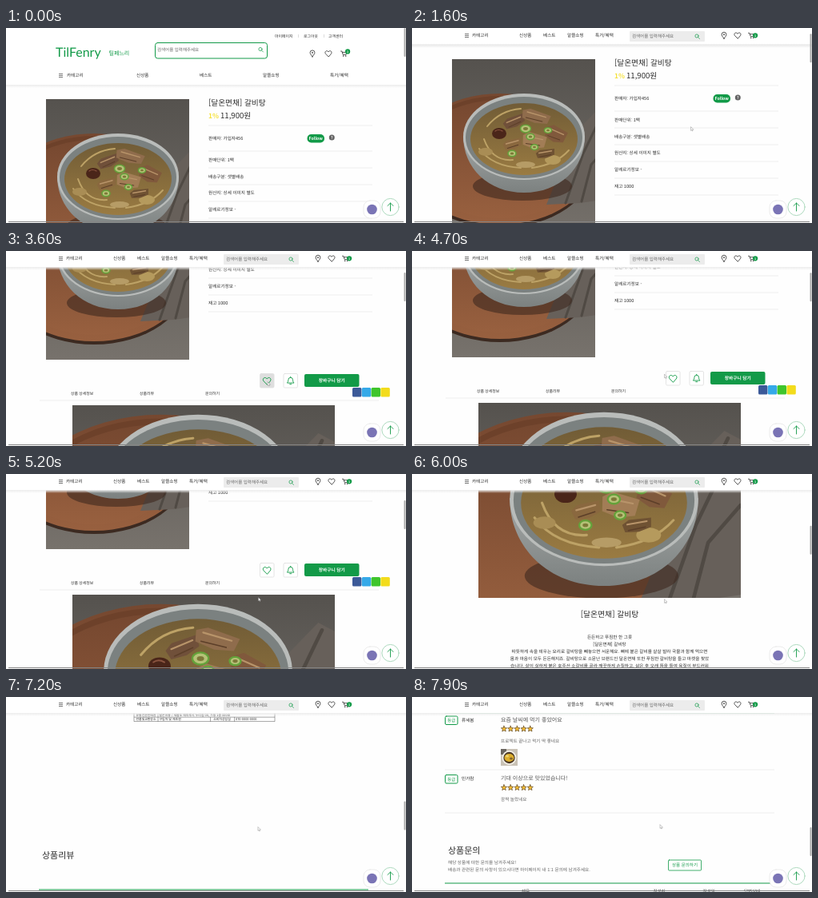
Write an HTML page that moves like this. It is 500 px wide and 244 px high and loops after 8000 ms.

```html
<!DOCTYPE html>
<html lang="ko">
<head>
<meta charset="utf-8">
<style>
html, body { margin: 0; width: 500px; height: 244px; overflow: hidden; background: #fefefe; }
svg { display: block; }
text { font-family: "Noto Sans CJK KR", "Noto Sans CJK", "Noto Sans KR", sans-serif; white-space: pre; text-rendering: geometricPrecision; }
</style>
</head>
<body>
<svg id="stage" width="500" height="244" viewBox="0 0 500 244"></svg>
<script>
const GREEN = '#129a48', INK = '#2b2b2b', PALE = '#e4e4e4';

// Basic shapes; text is placed by its vertical middle.
const text = (x, y, s, size = 5.6, attrs = '', fill = INK) =>
  `<text x="${x}" y="${y + size * .36}" font-size="${size}" fill="${fill}" ${attrs}>${s}</text>`;
const mid = (x, y, s, size, attrs = '', fill) => text(x, y, s, size, 'text-anchor="middle" ' + attrs, fill);
const rect = (x, y, w, h, fill, attrs = '') =>
  `<rect x="${x}" y="${y}" width="${w}" height="${h}" fill="${fill}" ${attrs}/>`;
const circle = (x, y, r, fill, attrs = '') => `<circle cx="${x}" cy="${y}" r="${r}" fill="${fill}" ${attrs}/>`;
const oval = (x, y, rx, ry, fill, attrs = '') =>
  `<ellipse cx="${x}" cy="${y}" rx="${rx}" ry="${ry}" fill="${fill}" ${attrs}/>`;
const path = (d, fill = 'none', attrs = '') => `<path d="${d}" fill="${fill}" ${attrs}/>`;
const rule = (x1, x2, y, color = PALE, w = .7) => rect(x1, y - w / 2, x2 - x1, w, color);
const at = (x, y, s, more = '') => `<g transform="translate(${x} ${y}) ${more}">${s}</g>`;
const frame = (x, y, w, h, s) => `<svg x="${x}" y="${y}" width="${w}" height="${h}">${s}</svg>`;
const outline = (color, w = 1) => `stroke="${color}" stroke-width="${w}" stroke-linejoin="round" stroke-linecap="round"`;

// Icons
const HEART = 'M0 3.8L-3.5.2C-5-1.6-3.2-4-1.3-3.2Q-.4-2.8 0-2Q.4-2.8 1.3-3.2C3.2-4 5-1.6 3.5.2Z';
const heart = (x, y, color) => at(x, y, path(HEART, 'none', outline(color, .8)));
const lens = (x, y) => at(x, y, circle(-.5, -.5, 2.1, 'none', outline(GREEN, .7)) + path('M1 1L3 3', 'none', outline(GREEN, .7)));
const pin = (x, y) => at(x, y, path('M0 4C-2 1-2.9.2-2.9-1.2A2.9 2.9 0 0 1 2.9-1.2C2.9.2 2 1 0 4Z', 'none', outline(INK, .8)) + circle(0, -1.2, .9, INK));
const cart = (x, y, badgeY) => at(x, y,
  path('M-4-3H-2.6L-1.3 1.3H2.6L3.6-1.6H-2', 'none', outline(INK, .8)) +
  circle(-.8, 3, .8, INK) + circle(2.2, 3, .8, INK) +
  circle(4.6, badgeY, 3.1, GREEN) + mid(4.6, badgeY, '1', 3.6, 'font-weight="700"', '#fff'));
const menu = (x, y) => [-2, 0, 2].map(d => rule(x, x + 5, y + d, '#555', .8)).join('');
const icons = (xs, y, badgeY) => pin(xs[0], y) + heart(xs[1], y, INK) + cart(xs[2], y, badgeY);
const star = (x, y) => {
  const p = [...Array(10).keys()].map(i => {
    const r = i % 2 ? 1.7 : 3.8, a = i * Math.PI / 5;
    return (x + r * Math.sin(a)).toFixed(2) + ' ' + (y - r * Math.cos(a)).toFixed(2);
  });
  return path('M' + p.join('L') + 'Z', '#f9bf35', outline('#5c4522', .7));
};

// A soup bowl on a wooden tray beside a cloth, centred on the bowl
const chunk = ([x, y, w, h, turn, color]) => at(x, y,
  path(`M${-w / 2} ${-h / 4}L${-w / 4} ${-h / 2}L${w / 2} ${-h / 3}L${w / 2.3} ${h / 3}L0 ${h / 2}L${-w / 2.2} ${h / 3}Z`, color) +
  path(`M${-w / 3} ${-h / 5}L${w / 3} ${-h / 7}`, 'none', outline('#b8946a', 1.4)) +
  path(`M${-w / 3} ${h / 4}L${w / 4} ${h / 4}`, 'none', outline('#5c3f29', 1)), `rotate(${turn})`);
const meat = [[-12, -20, 28, 14, -25, '#70503a'], [15, -26, 36, 16, 14, '#8f6c4c'], [40, -4, 27, 20, 20, '#80593c'],
  [13, 4, 30, 20, 8, '#a27d56'], [-14, 8, 24, 13, -18, '#8a683f'], [27, 20, 24, 11, -12, '#6f5233']];
const onions = [[2, -11, 6.5], [8, -1, 5], [-15, 20, 5], [13, 12, 4.5], [30, -9, 4.5]];

const meal =
  oval(-30, 31, 118, 82, '#3c2a21') + oval(-30, 27, 118, 82, 'url(#wood)') +
  oval(-30, 24, 112, 76, '#6d412a') + oval(-30, 27, 110, 74, 'url(#wood)') +
  path('M66-8L97-40L112-32V76L70 82L28 84Z', '#67605a') +
  path('M100-34L74 20L52 82M110 4L84 34L72 80', 'none', outline('#504a44', 3)) +
  oval(-2, 61, 62, 18, '#3e291e', 'opacity=".6"') +
  path('M-76-2C-76 38-45 69 0 69S76 38 76-2Z', 'url(#clay)') +
  oval(0, -1, 76, 54, '#b9bcba') + oval(0, 0, 73, 51, '#7b8180') + oval(0, 2, 67, 45, 'url(#broth)') +
  path('M-56 14Q-40 36-4 38M-50 2Q-40 30-14 28M-46-14Q-30-34-4-36M10 38Q40 34 56 16', 'none', outline('#bda266', 2)) +
  oval(-48, 18, 9, 5, '#a98d55') + oval(36, 28, 10, 6, '#b59a5d') + oval(2, 34, 12, 4, '#b69c66') +
  meat.map(chunk).join('') + oval(-31, -5, 9, 7, '#4a2519') + path('M-36-8Q-32-11-27-8', 'none', outline('#8a5440', 1.2)) +
  onions.map(([x, y, r]) => oval(x, y, r, r * .75, '#b5c277', outline('#64a23a', 1.5)) + oval(x, y, r * .45, r * .3, '#7d7838')).join('');

const productPhoto = frame(50, 89, 179, 230, rect(0, 0, 179, 230, 'url(#slate)') + at(90, 98, meal));
const detailPhoto = frame(83, 376, 328, 219, rect(0, 0, 328, 219, 'url(#slate)') + at(157, 97, meal, 'scale(1.55)'));

// Page sections
const fullHeader = () => rect(0, 0, 500, 71, '#fff') + rect(0, 71, 500, 4, 'url(#shade)') +
  text(336, 10, '마이페이지', 4.9) + text(372, 10, '로그아웃', 4.9) + text(403, 10, '고객센터', 4.9) +
  rect(365, 8, .5, 4, '#bbb') + rect(397, 8, .5, 4, '#bbb') +
  `<text x="62" y="36" font-size="16" fill="${GREEN}" style="font-family:Lato,sans-serif">TilFenry</text>` +
  text(128.5, 31, '틸페느리', 7, 'font-weight="500"', GREEN) +
  rect(186.5, 18.5, 140, 19.5, '#fff', 'rx="3" ' + outline(GREEN)) +
  text(189, 27, '검색어를 입력해주세요', 5.5, '', '#666') + lens(318.5, 27) +
  icons([383, 403, 422.5], 32, -2.6) + menu(66, 59.5) +
  [[76, '카테고리'], [163, '신상품'], [242, '베스트'], [321, '알뜰쇼핑'], [405, '특가/혜택']]
    .map(([x, s]) => text(x, 59, s, 5.6, 'font-weight="500"')).join('');

const slimHeader = () => rect(0, 0, 500, 20, '#fff') + rect(0, 20, 500, 4, 'url(#shade)') + menu(66, 9.5) +
  [[75, '카테고리'], [134, '신상품'], [164, '베스트'], [194, '알뜰쇼핑'], [229, '특가/혜택']]
    .map(([x, s]) => text(x, 8.5, s, 5.6, 'font-weight="500"')).join('') +
  rect(272, 4, 94, 13, '#ececec', 'rx="1"') + text(275, 10, '검색어를 입력해주세요', 5.5, '', '#666') +
  lens(356.5, 10.5) + icons([390, 407, 424.5], 9.3, 0);

const summary = () => productPhoto + text(253, 94, '[달온면채] 갈비탕', 9.7) +
  text(253, 109.5, '1%', 8.4, 'font-weight="700"', '#f5e23c') + text(268, 109.5, '11,900원', 9.6) +
  [122, 154, 175, 196, 217, 238, 259].map(y => rule(253, 458, y)).join('') +
  [[138, '판매자: 가입자456'], [164.5, '판매단위: 1팩'], [185.5, '배송구분: 샛별배송'], [206, '원산지: 상세 이미지 별도'],
    [227, '알레르기정보 -'], [247.5, '재고 1000']].map(([y, s]) => text(253, y, s, 5.6, 'font-weight="500"')).join('') +
  rect(376.5, 133, 21.5, 10.5, GREEN, 'rx="5"') + mid(387.2, 138, 'Follow', 5.3, 'font-weight="700"', '#fff') +
  circle(407.3, 137, 3.5, '#666') + mid(407.3, 137, '?', 5, 'font-weight="700"', '#fff');

const actions = () => rect(317.5, 336.5, 17.5, 17.5, '#fff', `id="like" rx="1.5" ${outline('#ddd', .8)}`) +
  at(326.2, 345.5, path(HEART, 'none', outline(GREEN, .8)), 'scale(1.2)') +
  rect(347, 336.5, 17.5, 17.5, '#fff', 'rx="1.5" ' + outline('#ddd', .8)) +
  at(355.7, 345.3, path('M-4 2.5Q-2.8 1.4-2.8-1Q-2.8-4 0-4T2.8-1Q2.8 1.4 4 2.5ZM-1 4.4H1M0-5V-4', 'none', outline(GREEN, .9))) +
  rect(373, 337, 68.5, 16, GREEN, 'rx="2"') + mid(407.3, 344.8, '장바구니 담기', 5.7, 'font-weight="700"', '#fff') +
  text(81, 361, '상품 상세정보', 4.9) + text(167, 361, '상품리뷰', 4.9) + text(249, 361, '문의하기', 4.9) +
  rule(42, 466, 370) +
  ['#3b5998', '#35a9e8', '#3fc52c', '#f3dc1c'].map((c, i) => rect(433 + i * 11.8, 354, 11.4, 11.4, c, 'rx="1.5"')).join('');

const story = () => detailPhoto + mid(247, 615, '[달온면채] 갈비탕', 9.8) +
  ['든든하고 푸짐한 한 그릇', '[달온면채] 갈비탕',
    '따뜻하게 속을 데우는 요리로 갈비탕을 빼놓으면 서운해요. 뼈에 붙은 갈비를 살살 발라 국물과 함께 먹으면',
    '몸과 마음이 모두 든든해지죠. 갈비탕으로 소문난 브랜드인 달온면채 또한 푸짐한 갈비탕을 들고 마켓을 찾았',
    '습니다. 살이 실하게 붙은 호주산 소갈비를 골라 깨끗하게 손질하고, 삶은 후 오래 뜸을 들여 육질이 부드러워',
    '요. 진하게 우린 육수는 담백하고 깔끔하며 넉넉하게 담긴 고기가 속을 든든하게 채워줍니다. 기호와 취향',
    '에 따라 후추, 당면 등을 더해서 드셔도 좋습니다.'].map((s, i) => mid(247, 643.5 + i * 9, s, 5.6)).join('');

const can = (x, top, label, size, labelY) => {
  const h = 835 - top;
  return at(x, top,
    path(`M-10 0H10L14.5 7V${h - 6}L10 ${h}H-10L-14.5 ${h - 6}V7Z`, 'url(#tin)', outline('#999', .7)) +
    oval(0, 1, 10, 1.5, '#ddd', outline('#999', .5)) + path(`M-14 7H14M-14 ${h - 6}H14`, 'none', outline('#bbb', .5)) +
    path('M-14-2V-3H14V-2', 'none', outline('#aaa', .5))) +
    mid(x, labelY, label, size, 'font-weight="700"', '#29365f') + mid(x, top - 6.5, '6.5cm', 6.5, '', '#777');
};
const sideMark = (x, y, s) => at(x, y, mid(0, 0, s, 6.5, '', '#777'), 'rotate(90)');

const box = () => frame(155, 766, 91, 68,
  rect(0, 0, 91, 68, '#3f2923', 'rx="3"') +
  [[22, 24, 18, '#7d4932'], [50, 16, 12, '#83502f'], [74, 10, 10, '#71412f'], [49, 45, 15, '#865433'], [12, 53, 12, '#71402b'], [79, 55, 13, '#5c3529']]
    .map(([x, y, r, c]) => circle(x, y, r, c, outline('#241a18', 2)) + oval(x, y, r * .65, r * .4, '#ab7143') +
      circle(x + r * .2, y - 2, r * .2, '#d3a263') + circle(x - r * .4, y + 2, r * .15, '#6e8736')).join('') +
  rect(0, 58, 91, 10, '#2d1c1a') + text(5, 62.5, '1,000g', 4, '', '#ddd') +
  rect(58, 21, 29, 28, '#2b2b43', outline('#385ba3', .8)) + circle(72, 28, 4, '#c9b28b') +
  mid(72.5, 41, '갈비탕', 9, 'font-weight="700"', '#eee'));

const facts = () => {
  const rows = [
    ['품       명', ['달온면채 갈비탕'], '내 용 량', '1,000g'],
    ['식 품 유 형', ['즉석조리식품(가열 후 섭취 냉동 식품 / 냉동 전 가열제품)']],
    ['품목보고번호', ['00000000000000 / 알레르기유발물질 : 대두, 밀, 우유, 소고기']],
    ['원료 및 함량', ['정제수, 소갈비(호주산), 혼합간장1(외국산), 소고기육수, 무,',
      '갈비농축액(호주산), 양파, 대파, 마늘, 복합조미식품, 정제소금',
      '설탕, 햄미분, 후추가루, 혼합간장2, 향미유, 대추, 당면, 식용유',
      '대두, 밀, 우유, 소고기 함유(조개류와 같은 시설에서 제조)']],
    ['유 통 기 한', ['제품에 별도표기일까지'], '포 장 재 질', '용기(PP),필름(PE)'],
    ['보 관 방 법', ['-18℃ 이하 냉동보관(해동 후 재냉동하지 마십시오.)']],
    ['제   조   원', ['달온식품 / 새봄도 해마루시 누리길 00, Tel. 000-000-0000']],
    ['유통전문판매원', ['달온유통 / 새봄도 해마루시 누리길 00, 가동 1층 000호']],
    ['반품및교환장소', ['구입처 및 제조원'], '소비자상담실', '070-0000-0000']];
  let y = 852, out = '';
  for (const [label, lines, key, value] of rows) {
    const h = lines.length * 5.1 + .5;
    out += rule(160, 336, y, '#555', .5) + mid(175, y + h / 2, label, 3.9, 'font-weight="500"');
    lines.forEach((s, i) => out += text(191.5, y + 2.8 + i * 5.1, s, 3.9, lines.length > 1 ? 'font-weight="700"' : ''));
    if (key) out += rect(255, y, .5, h, '#555') + rect(285, y, .5, h, '#555') +
      mid(270, y + h / 2, key, 3.9, 'font-weight="500"') + text(287, y + h / 2, value, 3.9);
    y += h;
  }
  return out + rule(160, 336, y, '#555', .5) + [160, 190, 336].map(x => rect(x - .25, 852, .5, y - 852, '#555')).join('');
};

const review = (y, name, title, body) =>
  rect(41.5, y - 4, 15.5, 10.5, '#fff', 'rx="1.5" ' + outline(GREEN)) +
  mid(49.2, y + 1.1, '등급', 5.4, 'font-weight="500"', GREEN) + text(62, y + .8, name) +
  text(111, y, title, 7, 'font-weight="500"', '#555') +
  [0, 1, 2, 3, 4].map(i => star(115 + i * 8.2, y + 12)).join('') + text(111, y + 26.5, body, 5.6, '', '#666');

const thumb = frame(111, 1173, 21, 21, rect(0, 0, 21, 21, '#c9c2b6') + rect(0, 0, 7, 7, '#6a655f') +
  circle(10.5, 11, 9, '#f3f0e8') + circle(10.5, 11, 7.2, '#4b3824') + oval(10.5, 11, 6, 5, '#dcae2d') +
  oval(8, 9, 2, 1.4, '#f0d66f') + oval(13, 12, 2, 1.5, '#85652c'));

const boards = () => text(45, 1085, '상품리뷰', 11, 'font-weight="500"') + rule(41, 453, 1128, GREEN, 1) +
  review(1136, '류세봄', '요즘 날씨에 먹기 좋았어요', '프로젝트 끝나고 먹기 딱 좋네요') + thumb + rule(41, 453, 1199) +
  review(1209.5, '민가람', '기대 이상으로 맛있었습니다!', '깜짝 놀랐네요') + rule(41, 453, 1253) +
  text(45, 1300, '상품문의', 11, 'font-weight="500"') +
  text(45, 1315, '해당 상품에 대한 문의를 남겨주세요!', 5.6, '', '#666') +
  text(45, 1323.5, '배송과 관련된 문의 사항이 있으시다면 마이페이지 내 1:1 문의에 남겨주세요.', 5.6, '', '#666') +
  rect(320.5, 1312, 41, 13, '#fff', 'rx="1" ' + outline(GREEN, .8)) + mid(341, 1318.3, '상품 문의하기', 5.5, '', GREEN) +
  rule(41, 453, 1341, GREEN, 1) +
  [[142, '제목'], [309, '작성자'], [371, '작성일'], [425, '답변상태']].map(([x, s]) => mid(x, 1351, s, 5.5, 'font-weight="500"')).join('');

const floating = () => rect(447, 216, 21, 22, '#fff', `rx="8" ${outline('#e2e2e2', .7)}`) + circle(457.5, 227, 6.3, '#7a74b5') +
  circle(480.5, 224, 10.6, '#fff', outline('#8ccaa4', .7)) + path('M480.5 229V219M477 222.5L480.5 219L484 222.5', 'none', outline(GREEN, .9)) +
  rect(3, 242, 494, 1, '#858585');

const gradient = (id, a, b, dir = 'x2="0" y2="1"', fade = 1) =>
  `<linearGradient id="${id}" ${dir}><stop stop-color="${a}"/><stop offset="1" stop-color="${b}" stop-opacity="${fade}"/></linearGradient>`;

const stage = document.getElementById('stage');
stage.innerHTML = '<defs>' + gradient('slate', '#55524e', '#77726c') + gradient('wood', '#764830', '#98603f') +
  gradient('clay', '#a3a7a6', '#7c8180') + gradient('broth', '#715c36', '#9a7b42') +
  gradient('tin', '#f0f0f0', '#cfcfcf', 'x2="1" y2="0"') + gradient('shade', '#ececec', '#ececec', 'x2="0" y2="1"', 0) + '</defs>' +
  '<g id="page">' + fullHeader() + summary() + actions() + story() + box() +
  can(278, 785, '355ml', 8, 811) + can(322, 763, '500ml', 8, 800) + sideMark(297, 810, '12cm') + sideMark(341.5, 802, '16.5cm') +
  facts() + boards() + '</g><g id="slim">' + slimHeader() + '</g>' + floating() +
  rect(497.5, 0, 2, 36, '#aaa', 'id="thumb" rx="1"') +
  `<g id="cursor">${path('M0 0V4.4L1.1 3.5L1.8 5L2.5 4.7L1.8 3.2H3.1Z', '#fff', outline('#777', .4))}</g>`;
const [page, slim, scroller, cursor, like] = ['page', 'slim', 'thumb', 'cursor', 'like'].map(id => document.getElementById(id));

// [ms, scroll] and [ms, x, y]
const scrollKeys = [[0, 0], [1300, 0], [1600, 50], [1900, 112], [2200, 160], [2600, 183], [4600, 183], [4900, 192], [5200, 225],
  [5400, 262], [5500, 262], [6000, 440], [6400, 587], [6500, 600], [6700, 674], [7300, 930], [7700, 1085], [7900, 1108], [8000, 1108]];
const cursorKeys = [[0, 348.5, 124], [2300, 348.5, 124], [2600, 338, 148], [2900, 338, 148], [3200, 327, 164], [3900, 327, 164],
  [4300, 315.5, 154.5], [5500, 315.5, 154.5], [6000, 315.5, 157], [6700, 318.5, 165], [7900, 310, 160], [8000, 310, 160]];

function sample(keys, t) {
  const i = keys.findIndex(k => k[0] > t), a = keys[i - 1], b = keys[i];
  const f = (t - a[0]) / (b[0] - a[0]);
  return a.slice(1).map((v, n) => v + (b[n + 1] - v) * f);
}

function draw(now) {
  const t = Math.floor(now % 8000 / 100) * 100; // the picture changes ten times a second
  const [scroll] = sample(scrollKeys, t), [x, y] = sample(cursorKeys, t);
  page.setAttribute('transform', `translate(0 ${-Math.round(scroll)})`);
  slim.setAttribute('visibility', scroll >= 50 ? 'visible' : 'hidden');
  scroller.setAttribute('y', scroll * .147);
  cursor.setAttribute('transform', `translate(${x} ${y})`);
  cursor.setAttribute('visibility', t >= 1400 ? 'visible' : 'hidden');
  const over = x > 317 && x < 335 && y + scroll > 336 && y + scroll < 354;
  like.setAttribute('fill', over ? '#dedede' : '#fff');
  requestAnimationFrame(draw);
}
requestAnimationFrame(draw);
</script>
</body>
</html>
```
